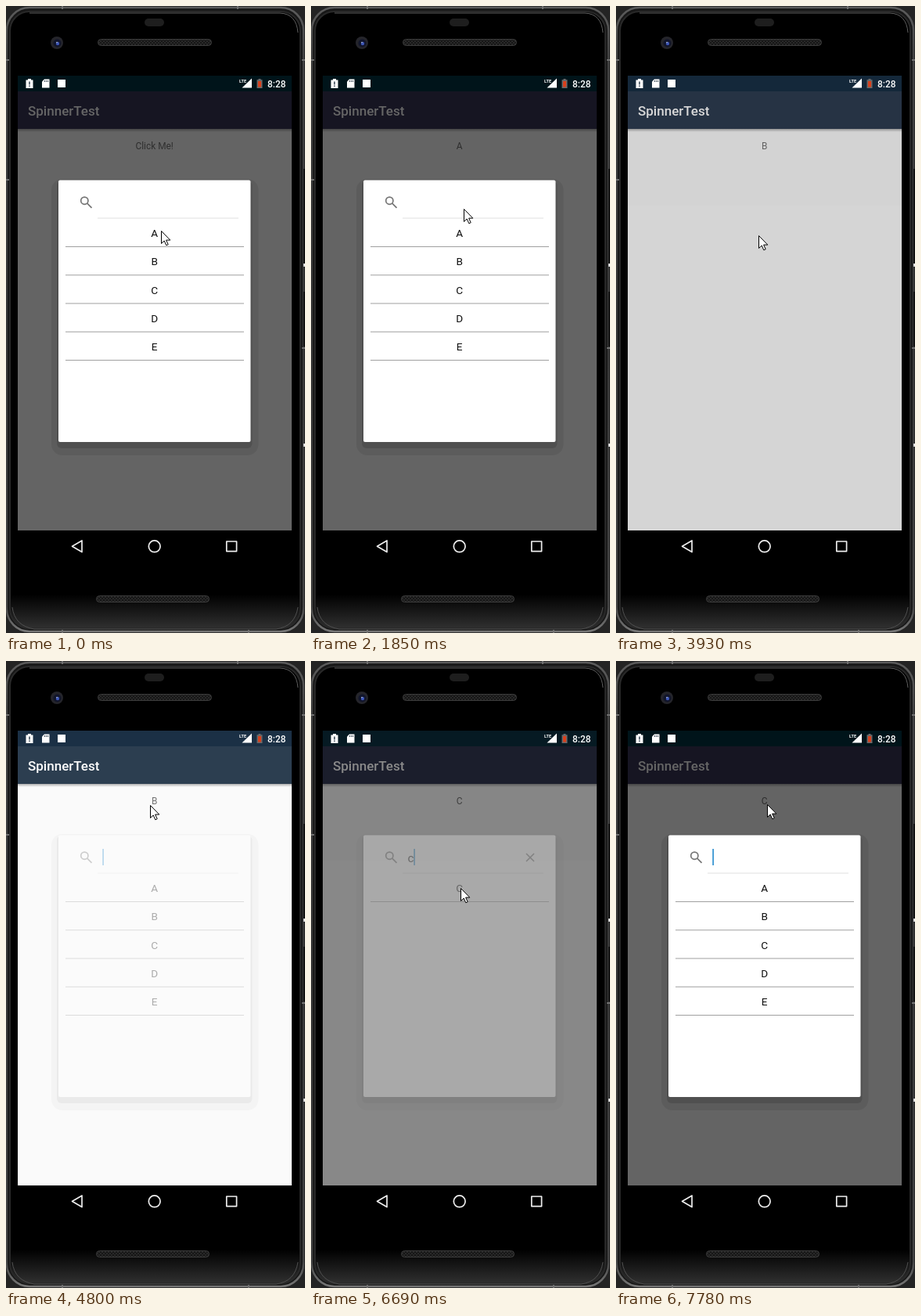
Write an HTML page that moves like this. It is 382 px wide and 801 px high and loops after 8 s.

```html
<!DOCTYPE html>
<html lang="en">
<head>
<meta charset="utf-8">
<title>Searchable spinner</title>
<style>
  html, body { margin: 0; width: 100%; height: 100%; overflow: hidden; background: #242424; }
  svg { display: block; width: 100%; height: 100%; font-family: Roboto, sans-serif; }
  .mid { text-anchor: middle; }
</style>
</head>
<body>
<svg viewBox="0 0 382 801">
  <defs>
    <linearGradient id="rim" x2="0" y2="1">
      <stop offset="0" stop-color="#5c5c5c"/><stop offset=".08" stop-color="#444"/>
      <stop offset=".5" stop-color="#383838"/><stop offset=".96" stop-color="#454545"/>
      <stop offset="1" stop-color="#777"/>
    </linearGradient>
    <linearGradient id="chin" x2="0" y2="1">
      <stop offset=".945" stop-color="#000"/><stop offset="1" stop-color="#303030"/>
    </linearGradient>
    <linearGradient id="drop" x2="0" y2="1">
      <stop offset="0" stop-opacity=".3"/><stop offset="1" stop-opacity="0"/>
    </linearGradient>
    <pattern id="mesh" width="4" height="4" patternUnits="userSpaceOnUse">
      <rect width="4" height="4" fill="#161616"/>
      <path d="M0 0h2v2h-2zM2 2h2v2h-2z" fill="#292929"/>
    </pattern>
  </defs>

  <!-- phone body -->
  <rect width="382" height="801" fill="#242424"/>
  <rect x="1" y="2" width="379" height="797" rx="29" fill="#171717" stroke="url(#rim)" stroke-width="2.5"/>
  <rect x="5" y="7" width="371" height="788" rx="25" fill="url(#chin)" stroke="#292929" stroke-width="2"/>
  <path d="M30 9H350Q371 10 373 34" fill="none" stroke="#606060"/>
  <path d="M8 768Q11 792 36 796H345Q369 793 373 768" fill="none" stroke="#505050"/>
  <path d="M0 69h4M0 222h4M378 69h4M378 437h4M72 797v4M310 797v4M72 0v4M296 0v4" stroke="#707070" stroke-width="2"/>
  <path d="M381 208v125M381 365v70" stroke="#111" stroke-width="2"/>
  <path d="M381 329v4M381 559v4" stroke="#ddd" stroke-width="2"/>
  <rect x="177" y="16" width="25" height="10" rx="5" fill="#1e1e1e"/>
  <circle cx="65" cy="47" r="8" fill="#25252b"/>
  <circle cx="65.5" cy="47.5" r="5" fill="#11152b"/>
  <circle cx="66" cy="48" r="2.2" fill="#3c55b5"/>
  <circle cx="65" cy="46.5" r=".8" fill="#bcd"/>
  <g fill="url(#mesh)" stroke="#3c3c3c">
    <rect x="117.5" y="42.5" width="145" height="8" rx="4"/>
    <rect x="115.5" y="753.5" width="144" height="8" rx="4"/>
  </g>
  <rect x="15" y="670" width="350" height="42"/>
  <g fill="none" stroke="#eee" stroke-width="1.7" stroke-linejoin="round">
    <path d="M84.5 690.3L97 683V697.6Z"/>
    <circle cx="189.7" cy="690.3" r="7.4"/>
    <rect x="281.8" y="684" width="12.8" height="12.6"/>
  </g>

  <!-- app -->
  <rect x="15" y="89" width="350" height="581" fill="#fafafa"/>
  <rect x="15" y="109" width="350" height="48" fill="#2c3e50"/>
  <rect x="15" y="89" width="350" height="20" fill="#1b3045"/>
  <rect x="15" y="157" width="350" height="4" fill="url(#drop)"/>
  <text id="choice" class="mid" x="189.7" y="183" font-size="11.9" fill-opacity=".54"></text>
  <g id="shade">
    <rect x="15" y="157" width="350" height="513" fill-opacity=".6"/>
    <rect x="15" y="109" width="350" height="48" fill="#161522"/>
    <rect x="15" y="89" width="350" height="20" fill="#00141a"/>
  </g>
  <text id="title" x="28" y="139.7" font-size="17.02" font-weight="500">SpinnerTest</text>

  <!-- status icons -->
  <g fill="#fff">
    <path d="M28 93h4v1.5h2.5V105H25.500V94.500H28z"/>
    <path d="M30 96.500v4M30 101.500v1.500" stroke="#123" stroke-width="1.3"/>
    <path d="M49 93.500h6.500V104.500H46V96.500z"/>
    <path d="M49.500 95v2M51.500 95v2M53.500 95v2" stroke="#123" stroke-width=".8"/>
    <rect x="66" y="94" width="10" height="10"/>
    <path d="M314 92.500V104.500H301.500z"/>
    <text x="298" y="98" font-size="5.6" font-weight="700">LTE</text>
    <path d="M322.500 93h3v1.300h2V105h-7V94.300h2z" fill="#69696b"/>
    <rect x="322" y="96" width="4" height="7.500" fill="#d8401c"/>
    <text x="334" y="103.500" font-size="11.9" font-weight="500">8:28</text>
  </g>

  <g id="dialog">
    <rect x="58" y="221" width="264.500" height="353" rx="14" fill-opacity=".08"/>
    <rect x="65" y="223" width="249.500" height="342" rx="6" fill-opacity=".13"/>
    <rect x="67" y="222.500" width="245.500" height="334.500" rx="2" fill="#fff"/>
    <g fill="none" stroke="#757575" stroke-width="1.7">
      <circle cx="100.300" cy="248.700" r="4.600"/>
      <path d="M103.700 252.100L109.500 257.900"/>
      <path id="clear" d="M275 246l10 10M285 246l-10 10" stroke-width="1.500"/>
    </g>
    <path d="M117 271h180" stroke="#e0e0e0"/>
    <text id="query" x="123.500" y="256.500" font-size="15.3" fill="#222"></text>
    <rect id="caret" y="240" width="1.800" height="21" fill="#3b97d3"/>
    <g id="rows" fill="#111"></g>
  </g>

  <path id="mouse" d="M.5.5V16.500L4.200 13L6.800 18.800L9.200 17.700L6.600 12.100H11.800Z" fill="#fff" stroke="#000" stroke-width="1"/>
</svg>
<script>
const LOOP = 8000;
const $ = id => document.getElementById(id);
const set = (id, name, value) => $(id).setAttribute(name, value);

// every track is a list of [time, ...values], held until the next entry
const at = (track, t) => track.findLast(k => k[0] <= t);

const mouse = [
  [0, 198, 287], [400, 184, 270], [520, 166, 248], [670, 190, 220], [790, 215, 192], [940, 210, 184],
  [1490, 207, 196], [1610, 203, 220], [1730, 198, 245], [1850, 195, 259],
  [2960, 205, 270], [3080, 213, 287], [3200, 200, 288], [3350, 182, 293],
  [4050, 182, 275], [4170, 183, 250], [4290, 183, 225], [4440, 184, 200], [4560, 184, 184],
  [5070, 186, 217], [5220, 194, 235], [5460, 208, 255],
  [5890, 217, 285], [6010, 206, 306], [6130, 191, 290],
  [6810, 190, 250], [6930, 190, 214], [7080, 195, 200], [7230, 193, 183]
];
const choice = [[0, "Click Me!"], [280, "A"], [3660, "B"], [6690, "C"]];
const query = [[0, ""], [2400, "b"], [4400, ""], [5340, "c"], [7300, ""]];
const caret = [[0, 0], [2250, 1], [2960, 0], [3350, 1], [5890, 0], [6410, 1]];

// [delay, dialog opacity, dim]
const show = [[0, .33, 0], [120, .8, .4], [270, 1, .6]];
const hide = [[0, .28, .46], [120, 0, .15], [240, 0, 0]];
const fade = [[0, 1, .6], ...[[280, hide], [1220, show], [3810, hide], [4800, show], [6690, hide], [7510, show]]
  .flatMap(([start, steps]) => steps.map(([delay, ...v]) => [start + delay, ...v]))];

const letters = [..."ABCDE"];
$("rows").innerHTML = letters.map((_, i) => {
  const y = 36.25 * i;
  return `<g><text class="mid" x="189.7" y="${295 + y}" font-size="13.6"></text>
    <path d="M76 ${307.5 + y}h228" stroke="#a0a0a0"/></g>`;
}).join("");
const rows = [...$("rows").children];

function draw(t) {
  const [, x, y] = at(mouse, t);
  const [, alpha, dim] = at(fade, t);
  const typed = at(query, t)[1];
  const found = letters.filter(c => c.includes(typed.toUpperCase()));
  const grey = 255 * (1 - dim);

  set("mouse", "transform", `translate(${x} ${y})`);
  set("dialog", "opacity", alpha);
  set("shade", "opacity", dim / .6);
  set("title", "fill", `rgb(${grey},${grey},${grey})`);
  $("choice").textContent = at(choice, t)[1];
  $("query").textContent = typed;
  set("clear", "opacity", typed ? 1 : 0);
  set("caret", "x", typed ? 131.2 : 123.2);
  set("caret", "opacity", at(caret, t)[1]);
  rows.forEach((row, i) => {
    row.setAttribute("opacity", i < found.length ? 1 : 0);
    row.firstChild.textContent = found[i] || "";
  });
}

const begin = performance.now();
function tick() {
  draw((performance.now() - begin) % LOOP);
  requestAnimationFrame(tick);
}
tick();
</script>
</body>
</html>
```
